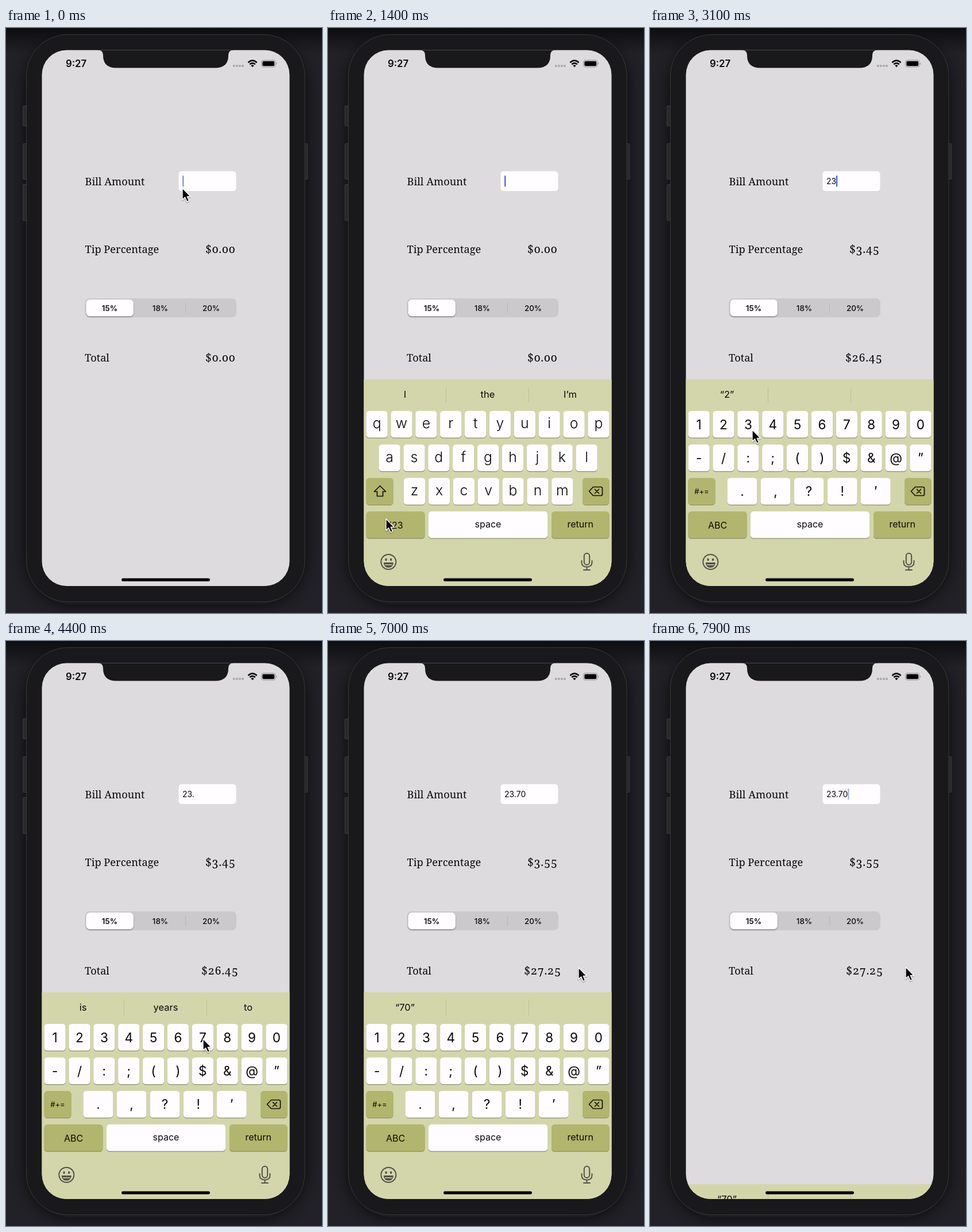
These frames come from a looping animation (550 by 1019 pixels, 8 s). An HTML page:

```html
<!DOCTYPE html>
<html lang="en">
<head>
<meta charset="utf-8">
<title>Tip calculator</title>
<style>
  html, body { margin: 0; width: 100%; height: 100%; overflow: hidden; background: #222127; }
  svg { display: block; width: 550px; height: 1019px; }
  text { font-family: Inter, Roboto, sans-serif; fill: #08080a; white-space: pre; }
  .serif { font-family: "Noto Serif", "Liberation Serif", serif; font-size: 18.2px; }
  .money { font-size: 19.6px; letter-spacing: .5px; font-variant-numeric: oldstyle-nums; }
  .mid { text-anchor: middle; }
  .line { fill: none; stroke: #101010; stroke-width: 1.7; stroke-linejoin: round; stroke-linecap: round; }
  .soft { stroke: #51524a; stroke-width: 2; }
</style>
</head>
<body>
<svg viewBox="0 0 550 1019" xmlns="http://www.w3.org/2000/svg">
  <defs>
    <clipPath id="glass"><rect x="62.5" y="38.5" width="431" height="933.5" rx="43"/></clipPath>
    <filter id="blur" x="-20%" y="-20%" width="140%" height="140%"><feGaussianBlur stdDeviation="14"/></filter>
    <filter id="lift" x="-40%" y="-40%" width="200%" height="200%">
      <feDropShadow dx="0" dy="1.5" stdDeviation="1.3" flood-opacity=".35"/>
    </filter>
    <linearGradient id="top" x2="0" y2="1">
      <stop stop-color="#0e0d10"/><stop offset="1" stop-color="#0e0d10" stop-opacity="0"/>
    </linearGradient>
  </defs>

  <rect width="550" height="1019" fill="#222127"/>
  <rect x="35" y="18" width="485" height="986" rx="80" fill="#0b0a0d" opacity=".75" filter="url(#blur)"/>
  <rect width="550" height="45" fill="url(#top)"/>
  <g fill="#29282b" stroke="#3b3a3d">
    <rect x="29.5" y="135.5" width="9" height="35" rx="1.5"/>
    <rect x="29.5" y="201.5" width="9" height="62" rx="1.5"/>
    <rect x="29.5" y="272.5" width="9" height="63" rx="1.5"/>
    <rect x="516" y="201.5" width="9" height="62" rx="1.5"/>
  </g>
  <rect x="35.5" y="11.5" width="484.5" height="988" rx="72" fill="#19181b" stroke="#39383b"/>

  <g clip-path="url(#glass)">
    <rect x="62" y="38" width="432" height="935" fill="#dddbde"/>
    <path d="M160 38H396V38.5Q387 38.5 387 47V48Q387 69.5 364 69.5H192Q169 69.5 169 48V47Q169 38.5 160 38.5Z" fill="#19181b"/>

    <text x="104" y="68" font-size="16.8" font-weight="600">9:27</text>
    <g fill="#aaa8ac">
      <circle cx="396.8" cy="66" r="2.1"/><circle cx="401.9" cy="66" r="2.1"/>
      <circle cx="407" cy="66" r="2.1"/><circle cx="412" cy="66" r="2.1"/>
    </g>
    <g fill="none" stroke="#08080a" stroke-width="2.6">
      <path d="M421.4 60.2Q429 53.2 436.6 60.2"/><path d="M424.2 63.3Q429 59 433.8 63.3"/>
    </g>
    <path d="M426.2 65.3Q429 63 431.8 65.3L429 68.2Z" fill="#08080a"/>
    <rect x="444.5" y="56" width="24.5" height="12" rx="3.4" fill="none" stroke="#929094"/>
    <rect x="446.3" y="57.8" width="20.9" height="8.4" rx="2" fill="#000"/>
    <path d="M470.2 60Q472.4 62 470.2 64Z" fill="#929094"/>

    <g class="serif">
      <text class="serif" x="137.5" y="273.5">Bill Amount</text>
      <text class="serif" x="137.5" y="392.3">Tip Percentage</text>
      <text class="serif" x="137" y="581">Total</text>
      <text class="serif money" id="tip" x="347" y="392.3"></text>
      <text class="serif money" id="total" y="581"></text>
    </g>

    <rect x="300.5" y="249.5" width="100" height="34.5" rx="5" fill="#fffdff"/>
    <text id="bill" x="307" y="272" font-size="14"></text>
    <rect id="caret" y="257" width="2.2" height="19.5" rx="1" fill="#4660cb"/>

    <rect x="137.5" y="471" width="263.5" height="33" rx="8" fill="#cbc9cb"/>
    <rect x="139.5" y="473" width="82.3" height="29" rx="6.5" fill="#fffdff" filter="url(#lift)"/>
    <rect x="312" y="479" width="1.1" height="17" fill="#b9b7ba"/>
    <g class="mid" font-size="13.4" font-weight="500">
      <text x="180.5" y="492.8" font-weight="600">15%</text>
      <text x="268.5" y="492.8">18%</text>
      <text x="357" y="492.8">20%</text>
    </g>

    <g id="board">
      <rect x="62" y="612" width="432" height="362" fill="#d3d6ab"/>
      <path d="M205.5 626V652M349.5 626V652" stroke="#bdc098"/>
      <g class="mid" font-size="16.5" id="hints"></g>
      <g id="alpha"></g>
      <g id="digit"></g>
      <g id="shared"></g>
      <g class="line">
        <path d="M461.5 799.5H475Q477.500 799.5 477.500 802V812Q477.500 814.500 475 814.500H461.500L454.500 807Z"/>
        <path d="M464.500 803.500L471.500 810.500M471.500 803.500L464.500 810.500"/>
      </g>
      <g class="line soft">
        <circle cx="105.300" cy="930" r="13"/>
        <path d="M97.800 932H112.800Q112 939 105.300 939T97.800 932Z" fill="#51524a"/>
        <path d="M99.500 935H111" stroke="#d3d6ab" stroke-width="1.600"/>
        <rect x="445.800" y="915" width="9.400" height="20" rx="4.700"/>
        <path d="M441.500 928V930.500Q441.500 938.700 450.500 938.700T459.500 930.500V928M450.500 939V944M445 944H456"/>
      </g>
      <g fill="#51524a"><ellipse cx="101" cy="926" rx="1.700" ry="2.300"/><ellipse cx="109.600" cy="926" rx="1.700" ry="2.300"/></g>
    </g>
    <rect x="201" y="958.5" width="154" height="5.2" rx="2.600" fill="#050507"/>
  </g>

  <path id="mouse" d="M0 0V20L4.600 15.800L8 23.300L11.400 21.800L8.200 14.500H14.300Z"
    fill="#000" stroke="#fff" stroke-width="1.300" stroke-linejoin="round" filter="url(#lift)"/>
</svg>

<script>
const $ = id => document.getElementById(id);
const LOOP = 8000, STEP = 100, ROWS = [667, 725.5, 783.7, 842], PITCH = 42.87;

function add(parent, tag, attrs, label = '') {
  const el = document.createElementNS('http://www.w3.org/2000/svg', tag);
  for (const k in attrs) el.setAttribute(k, attrs[k]);
  el.textContent = label;
  return parent.appendChild(el);
}

function key(parent, x, row, w, label, size, drop, dark, weight = 400) {
  const box = { x, y: ROWS[row], width: w, height: 46.5, rx: 5.3 };
  add(parent, 'rect', { ...box, y: box.y + 1.2, fill: '#8d8f70' });
  add(parent, 'rect', { ...box, fill: dark ? '#b2b56d' : '#fffdff' });
  add(parent, 'text', { x: x + w / 2, y: box.y + drop, class: 'mid', 'font-size': size, 'font-weight': weight }, label);
}

const keys = (parent, chars, x, row, w, pitch, ...style) =>
  [...chars].forEach((c, i) => key(parent, x + i * pitch, row, w, c, ...style));

// Letter page
keys($('alpha'), 'qwertyuiop', 66.5, 0, 37.2, PITCH, 24.8, 30, false, 300);
keys($('alpha'), 'asdfghjkl', 88.5, 1, 37.2, PITCH, 24.8, 30, false, 300);
keys($('alpha'), 'zxcvbnm', 132, 2, 37.2, PITCH, 24.8, 30, false, 300);
key($('alpha'), 66.5, 2, 47, '', 16, 30, true);
add($('alpha'), 'path', { class: 'line', d: 'M90.500 797.500L100.500 807.500H95.500V815.500H85.500V807.500H80.500Z' });
key($('alpha'), 66.5, 3, 102, '123', 16, 29.5, true);

// Number page
keys($('digit'), '1234567890', 66.5, 0, 37.2, PITCH, 22.5, 31.5);
keys($('digit'), '-/:;()$&@”', 66.5, 1, 37.2, PITCH, 22.5, 31);
keys($('digit'), '.,?!’', 134.5, 2, 51.8, 58.1, 22.5, 31);
key($('digit'), 66.5, 2, 47, '#+=', 13, 28.5, true);
key($('digit'), 66.5, 3, 102, 'ABC', 16, 30, true);

key($('shared'), 443, 2, 46.5, '', 16, 30, true);
key($('shared'), 175, 3, 207, 'space', 16, 27.5);
key($('shared'), 389, 3, 100.5, 'return', 16, 27.5, true);

const hints = [134, 278, 421.5].map(x => add($('hints'), 'text', { x, y: 644 }));

// time, bill, tip, total, total x, caret x
const ENTRIES = [
  [30, '', '$0.00', '$0.00', 347, 307.2],
  [2500, '2', '$0.30', '$2.30', 347, 315.6],
  [3000, '23', '$3.45', '$26.45', 340, 324],
  [3600, '23.', '$3.45', '$26.45', 340, 328],
  [4600, '23.7', '$3.55', '$27.25', 341.3, 336],
  [5200, '23.70', '$3.55', '$27.25', 341.3, 344.2]
];
const HINTS = [
  [0, 'I', 'the', 'I’m'],
  [2700, '“2”', '', ''],
  [3200, '“23”', '', ''],
  [3800, 'is', 'years', 'to'],
  [4800, '“7”', '', ''],
  [5500, '“70”', '', '']
];
// time, x, y
const MOUSE = [
  [0, 307, 279], [400, 307, 279], [1200, 101, 855], [1700, 101, 855],
  [2400, 136, 700], [2600, 136, 700], [2900, 178, 700], [3150, 178, 700],
  [3500, 165, 813], [3750, 165, 813], [4300, 343, 693], [4700, 343, 693],
  [5050, 478, 696], [5250, 478, 696], [5800, 446, 523], [6300, 446, 523],
  [7000, 436, 569], [7300, 436, 569], [7700, 445, 568], [8000, 445, 568]
];

const clamp = v => Math.min(1, Math.max(0, v));
const latest = (table, t) => table.filter(row => row[0] <= t).pop() || table[0];
const slide = (t, start) => 1 - (1 - clamp((t - start) / 450)) ** 3;

function pointer(t) {
  const i = MOUSE.findIndex(p => p[0] > t), a = MOUSE[i - 1], b = MOUSE[i];
  const u = (t - a[0]) / (b[0] - a[0]), e = u * u * (3 - 2 * u);
  return [1, 2].map(k => a[k] + (b[k] - a[k]) * e);
}

function blink(age) {
  const p = ((age % 1000) + 1000) % 1000;
  return p < 800 ? 1 - clamp((p - 650) / 100) : clamp((p - 900) / 100);
}

function draw(t) {
  const [since, bill, tip, total, totalX, caretX] = latest(ENTRIES, t);
  $('bill').textContent = bill;
  $('tip').textContent = tip;
  $('total').textContent = total;
  $('total').setAttribute('x', totalX);
  $('caret').setAttribute('x', caretX);
  $('caret').setAttribute('opacity', blink(t - since));

  const words = latest(HINTS, t);
  hints.forEach((el, i) => el.textContent = words[i + 1]);
  $('alpha').style.display = t < 1600 ? '' : 'none';
  $('digit').style.display = t < 1600 ? 'none' : '';

  const shown = slide(t, 100) - slide(t, 7637);
  $('board').setAttribute('transform', `translate(0 ${360 * (1 - shown)})`);
  $('mouse').setAttribute('transform', `translate(${pointer(t)})`);
}

const begin = performance.now();
function tick() {
  const t = (performance.now() - begin) % LOOP;
  draw(Math.floor(t / STEP) * STEP);
  requestAnimationFrame(tick);
}
tick();
</script>
</body>
</html>
```
